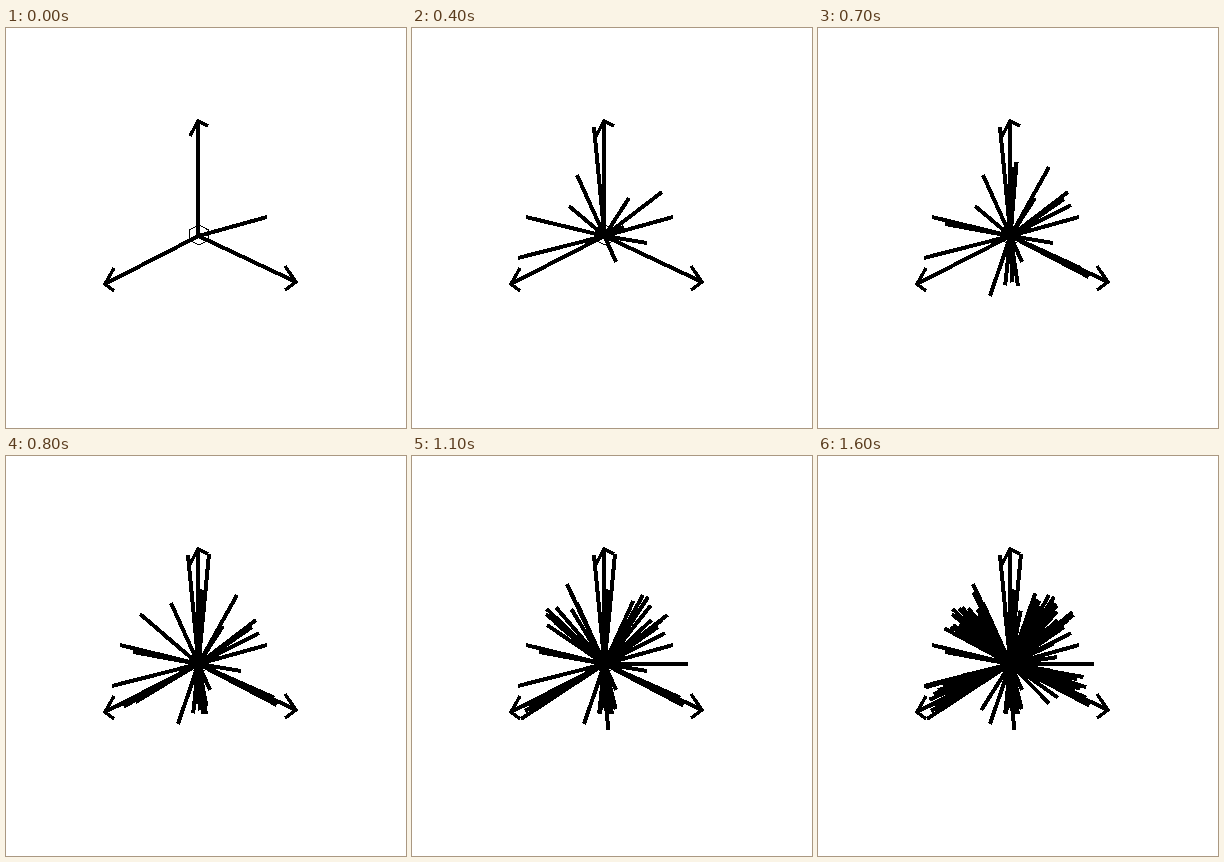
These frames come from a looping animation (400x400 px, 2400 ms). An HTML page:

```html
<!DOCTYPE html>
<html>
<head>
<meta charset="utf-8">
<style>
  html, body { margin: 0; width: 100%; height: 100%; overflow: hidden; background: #fff; }
  svg { display: block; width: 100vw; height: 100vh; }
  path { fill: none; stroke: #000; stroke-width: 4; shape-rendering: crispEdges; }
  .cube { stroke-width: 1; }
  .heads { stroke-width: 3.4; }
</style>
</head>
<body>
<svg viewBox="0 0 400 400">
  <path class="cube" d="M193 197L202.500 202V212L193 217L183.500 212V202Z"/>
  <path d="M192 208V93M192.500 208L99 256M192.500 208L290 254"/>
  <path class="heads" d="M184 108L192 93L202 98M108 240L99 256L108 263M279 238L290 254L279 262"/>
  <path id="spokes"/>
</svg>
<script>
const LOOP = 2400, STEP = 100, LAST_STEP = 16, CX = 192.5, CY = 208;

// Tips of the leading spokes, in order of appearance.
const tips = [
  [261, 189], [157, 178], [235, 215], [212, 199], [182, 99], [114, 189],
  [204, 234], [217, 170], [165, 147], [250, 164], [106, 230], [127, 196],
  [246, 171], [172, 268], [231, 139], [253, 177], [200, 258], [203, 98],
  [134, 158], [155, 128], [276, 208], [109, 263], [196, 274]
];

// Later spokes crowd into fans around these directions.
const fans = [
  { angle: 26, spread: 2, reach: 94, from: 6, to: 10 },
  { angle: 87, spread: 11, reach: 53, from: 7, to: 10 },
  { angle: -87, spread: 2, reach: 79, from: 7, to: 9 },
  { angle: 150, spread: 3, reach: 98, from: 8, to: 10 },
  { angle: -53, spread: 18, reach: 85, from: 10, to: 13 },
  { angle: -132, spread: 20, reach: 85, from: 10, to: 13 },
  { angle: 158, spread: 8, reach: 94, from: 14, to: 16 },
  { angle: 19, spread: 9, reach: 84, from: 14, to: 16 },
  { angle: -90, spread: 150, reach: 62, from: 12, to: 16 }
];

const PER_STEP = 3;
const spoke = (x, y) => `M${CX} ${CY}L${x} ${y}`;

// Spreads spokes evenly over a fan, whatever their number.
function fanSpoke({ angle, spread, reach }, n) {
  const turn = (n * 0.618 + 0.3) % 1 * 2 - 1;
  const a = (angle + spread * turn) * Math.PI / 180;
  const length = reach * (0.75 + 0.25 * ((n * 0.755) % 1));
  return spoke(CX + length * Math.cos(a), CY + length * Math.sin(a));
}

function spokesAt(step) {
  const count = Math.min(1 + step * (step + 1) / 2, 2 * step + 3);
  let path = tips.slice(0, count).map(tip => spoke(...tip)).join("");
  for (const fan of fans) {
    const total = PER_STEP * (Math.min(step, fan.to) - fan.from + 1);
    for (let n = 0; n < total; n++) path += fanSpoke(fan, n);
  }
  return path;
}

const spokes = document.getElementById("spokes");
function draw() {
  const step = Math.floor(performance.now() % LOOP / STEP);
  spokes.setAttribute("d", spokesAt(Math.min(step, LAST_STEP)));
  requestAnimationFrame(draw);
}
draw();
</script>
</body>
</html>
```
